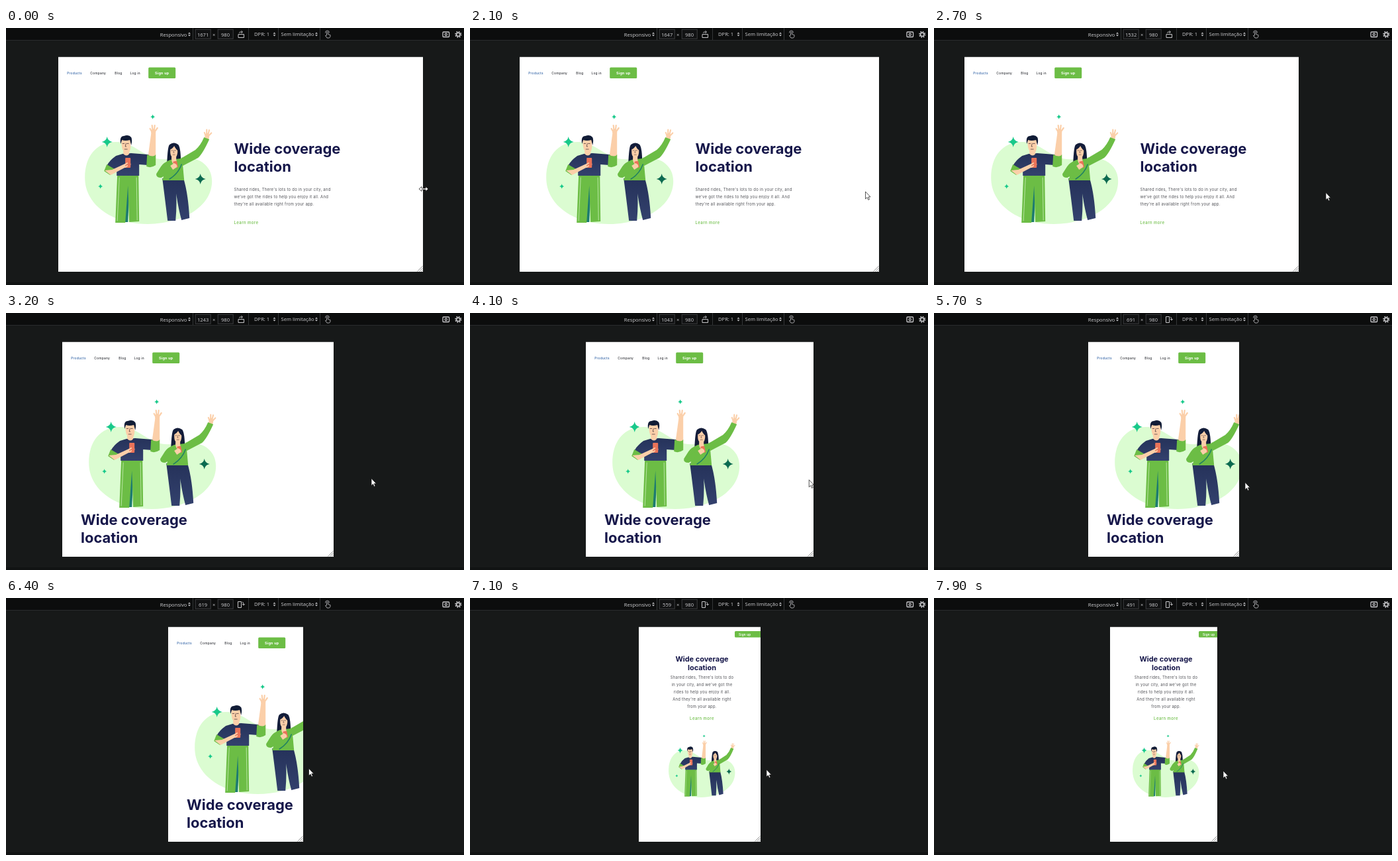
Write an HTML page that moves like this. It is 692x388 px and loops after 8000 ms.

```html
<!DOCTYPE html>
<html lang="pt">
<head>
<meta charset="utf-8">
<title>Responsive view</title>
<style>
html, body { margin: 0; width: 100%; height: 100%; overflow: hidden; background: #171919; }
svg { display: block; }
#stage { width: 692px; height: 388px; }
text { font-family: Inter, "Open Sans", sans-serif; white-space: pre; }
.bar text { font: 7.6px "Noto Sans", "Open Sans", sans-serif; fill: #c3c3c6; }
.icon { fill: none; stroke: #c6c6c9; stroke-width: 1; }
.sep { stroke: #343638; }
.box { fill: #111213; stroke: #3c3e40; }
.nav { font-size: 4.8px; font-weight: 500; letter-spacing: .24px; fill: #34363c; }
.title { font-size: 21.95px; font-weight: 700; fill: #16174a; }
.body { font-size: 5.9px; letter-spacing: .26px; fill: #505156; }
.link { font-size: 6px; font-weight: 500; letter-spacing: .42px; fill: #6cbd45; }
.sign { font-size: 5.4px; font-weight: 700; letter-spacing: .22px; fill: #fff; }
.mid { text-anchor: middle; }
.skin { fill: #fbcfa9; }
.green { fill: #6cbd45; }
.navy { fill: url(#navy); }
.line { fill: none; stroke-linecap: round; }
</style>
</head>
<body>
<svg id="stage" viewBox="0 0 692 388">
  <defs>
    <path id="sort" d="M0 -.7L2 -3L4 -.7ZM0 .7L2 3L4 .7Z" fill="#c3c3c6"/>
    <path id="star" d="M0 -8Q1.200 -1.200 8 0Q1.200 1.200 0 8Q-1.200 1.200 -8 0Q-1.200 -1.200 0 -8Z"/>
    <linearGradient id="navy" x2="0" y2="1"><stop stop-color="#25325a"/><stop offset="1" stop-color="#33416d"/></linearGradient>
    <g id="hand">
      <ellipse class="skin" cy="-4" rx="3.600" ry="6"/>
      <path class="line" stroke="#fbcfa9" stroke-width="2.200" d="M-1 -3L-5 -10M-1 -6L-2 -15M1 -6L2 -15M1 -4L6 -11"/>
    </g>
    <path id="face" class="line" stroke="#3b2b34" stroke-width=".7" d="M-5 0H-2.500M1.500 0H4M0 0L-1 4.500H.5M-2 8.500H2"/>

    <g id="art">
      <path fill="#dbfcd1" d="M119 226C119 194 136 172 166 172C196 172 212 202 244 198C286 188 311 205 311 231C311 272 262 296 214 296C160 296 119 267 119 226Z"/>
      <use href="#star" x="152.500" y="172" fill="#18c98a"/>
      <use href="#star" transform="translate(221.500 134) scale(.48)" fill="#18c98a"/>
      <use href="#star" transform="translate(142.500 239) scale(.48)" fill="#18c98a"/>
      <use href="#star" x="293.500" y="228" fill="#0b6a50"/>

      <!-- man -->
      <path class="skin" d="M213 204L219 160H226V204Z"/>
      <use href="#hand" x="222.500" y="162"/>
      <path fill="#1d7b70" d="M181 230H187L184 293H179Z"/>
      <path class="green" d="M168 221H200L201 292L186 293L184 238L180 294H165Z"/>
      <path class="line" stroke="#c9efb8" stroke-width=".8" d="M171 226L168 291M197 226L198 290"/>
      <path class="navy" d="M176 190L166 193Q156 200 152 208L163 215L167 212V223H201V206L214 207Q217 204 215 191L189 189Z"/>
      <path class="green" d="M152 206L164 213L157 222L148 216ZM213 191Q223 196 226 191V207Q219 212 212 209Z"/>
      <path class="skin" d="M149 215L158 222L179 211L187 209Q190 205 186 202L160 214Z"/>
      <rect x="180" y="196" width="8" height="15" rx="1" fill="#ea7359"/>
      <path class="line" stroke="#fbcfa9" stroke-width="2" d="M180 206L183 204M180 210L183 208"/>
      <path class="skin" d="M174 168H188V180Q187 187 186 187V190Q182 195 177 190V185Q174 182 174 168Z"/>
      <path fill="#111c36" d="M173 175Q171 163 178 163Q185 160 189 165Q191 169 189 177L187 169Q180 171 175 169Z"/>
      <use href="#face" x="181" y="174.500"/>

      <!-- woman -->
      <use href="#hand" transform="translate(303 168) rotate(8) scale(.95)"/>
      <path fill="#141d3a" d="M243 205Q244 178 247 176Q253 171 260 176Q264 181 264 204Q256 207 243 205Z"/>
      <path class="navy" d="M236 227H268Q275 250 277 287L265 290Q260 272 257 250Q258 270 256 291H244Q240 258 236 227Z"/>
      <path class="green" d="M248 199Q238 203 234 209L227 220Q226 226 234 226L238 224L236 230H269L267 208L290 196Q297 190 307 168L299 165Q294 177 286 184L264 197Z"/>
      <path class="line" stroke="#218062" stroke-width="1.600" d="M265 206Q260 220 247 228"/>
      <path class="skin" d="M248 179Q254 175 259 180V188Q258 194 257 194V199Q259 203 254 206Q249 204 250 194Q248 192 248 187Z"/>
      <path fill="#141d3a" d="M246 184Q248 174 255 176Q261 178 261 186Q256 183 254 178Q251 183 246 184Z"/>
      <use href="#face" transform="translate(253.500 185) scale(.75)"/>
      <path class="green" d="M229 218L248 208L252 213L234 226Z"/>
      <rect x="253" y="201" width="6" height="10" rx="1" fill="#ea7359" transform="rotate(-12 256 206)"/>
      <path class="skin" d="M248 208L254 204Q259 206 258 210L252 214Z"/>
    </g>
  </defs>

  <rect width="692" height="388" fill="#171919"/>
  <rect y="384" width="692" height="4" fill="#111313"/>

  <g class="bar">
    <rect width="692" height="18.500" fill="#0c0d0d"/>
    <path d="M0 18.500H692" stroke="#2a2c2d"/>
    <path class="sep" d="M282.500 0V18M366.500 0V18M411.500 0V18M474.500 0V18"/>
    <rect class="box" x="286.200" y="2.200" width="23" height="14"/>
    <rect class="box" x="320.200" y="2.200" width="23" height="14"/>
    <text x="232.800" y="12.500">Responsivo</text>
    <text id="size" class="mid" x="297.600" y="12.500">1671</text>
    <text class="mid" x="314.200" y="12.500">×</text>
    <text class="mid" x="331.500" y="12.500">980</text>
    <text x="375" y="12.300">DPR: 1</text>
    <text x="415.500" y="12.300">Sem limitação</text>
    <use href="#sort" x="275" y="9.500"/>
    <use href="#sort" x="403.500" y="9.500"/>
    <use href="#sort" x="467" y="9.500"/>
    <g class="icon">
      <path id="wide" d="M351 9.500H359.500V14.500H351ZM352 7.500Q352.500 5.500 357 6M355.500 4.200L357.500 6L355.500 7.800"/>
      <path id="tall" d="M350.500 5.500H355.500V14.500H350.500ZM357 6Q359 6 359 10.500M357.200 9L359 11L360.800 9"/>
      <path d="M484.500 11V6.500Q485.500 5 486.500 6.500V9.500L490 10.500V13L488.500 15H485L482.500 11.500ZM482.700 7.500Q482.300 4 485.500 4Q488.700 4 488.300 7.500" stroke-width=".8"/>
      <rect x="660" y="6" width="9.600" height="7.500" rx="1" stroke-width="1.300"/>
      <circle cx="664.800" cy="9.800" r="1.600" stroke-width="1.200"/>
      <circle cx="683.300" cy="9.800" r="2.700" stroke-width="1.600"/>
      <circle cx="683.300" cy="9.800" r="4.300" stroke-width="1.600" stroke-dasharray="1.690"/>
    </g>
  </g>

  <svg id="panel" y="43.500" height="324.500" overflow="hidden">
    <rect width="100%" height="100%" fill="#fff"/>
    <!-- rows follow the stage, columns follow the panel -->
    <g transform="translate(0 -43.500)">
      <g id="desk">
        <text class="nav" x="13.300" y="69.700" style="fill:#3767a8">Products</text>
        <text class="nav" x="48.300" y="69.700">Company</text>
        <text class="nav" x="85.300" y="69.700">Blog</text>
        <text class="nav" x="108.500" y="69.700">Log in</text>
        <rect x="136.200" y="59.500" width="41" height="16.500" rx="1.500" class="green"/>
        <text class="sign mid" x="156.700" y="69.700">Sign up</text>
        <use href="#art" x="-78.800"/>
        <g id="head" class="title"><text>Wide coverage</text><text y="27">location</text></g>
        <g id="copy" transform="translate(265.500 0)">
          <g class="body">
            <text y="245.700">Shared rides, There's lots to do in your city, and</text>
            <text y="256.700">we've got the rides to help you enjoy it all. And</text>
            <text y="267.700">they're all available right from your app.</text>
          </g>
          <text class="link" y="296">Learn more</text>
        </g>
      </g>
      <g id="phone">
        <rect x="53" y="50" width="41" height="9.500" rx="1.500" class="green"/>
        <text class="sign" x="59" y="56.500" style="font-size:4.6px;font-weight:600">Sign up</text>
        <g class="mid" transform="translate(3.500 0)">
          <g class="title" style="font-size:10.950px"><text y="95.800">Wide coverage</text><text y="108.800">location</text></g>
          <g class="body">
            <text y="122">Shared rides, There's lots to do</text>
            <text y="133">in your city, and we've got the</text>
            <text y="144">rides to help you enjoy it all.</text>
            <text y="155">And they're all available right</text>
            <text y="166">from your app.</text>
          </g>
          <text class="link" y="184">Learn more</text>
        </g>
        <use href="#art" transform="translate(-109.200 131.700) scale(.523 .572)"/>
      </g>
    </g>
    <path id="grip" d="M-8 324L0 316M-5 324L0 319M-2 324L0 322" stroke="#777" stroke-width=".8"/>
  </svg>

  <g fill="#fff" stroke="#111" stroke-width=".7" stroke-linejoin="round">
    <path id="arrow" d="M0 0V11L2.500 8.700L4.300 12.500L6 11.700L4.300 8H7.500Z"/>
    <path id="resize" d="M-7 0L-3 -3.500V-1H3V-3.500L7 0L3 3.500V1H-3V3.500Z"/>
  </g>
</svg>
<script>
const $ = id => document.getElementById(id);
const set = (id, attrs) => { for (const k in attrs) $(id).setAttribute(k, attrs[k]); };
const show = (id, on) => { $(id).style.display = on ? "" : "none"; };
const move = (id, x, y) => set(id, { transform: `translate(${x} ${y})` });

const LOOP = 8000, STEP = 100, ZOOM = .33, CENTRE = 347;

// [time, value] stops of the drag, joined by straight runs
const widths = [[1500, 1671], [1900, 1647], [2500, 1647], [3200, 1243], [3500, 1243], [4300, 976],
  [4600, 976], [4700, 935], [4800, 935], [5200, 776], [5700, 691], [6400, 619], [7900, 491]];
const pointer = [[1500, 631], [2100, 597.5], [2500, 608], [3200, 552], [3500, 552],
  [4300, 499], [4700, 489], [5700, 470], [6400, 457.5], [7900, 437]];

function along(stops, t) {
  const i = stops.findIndex(s => s[0] > t);
  if (i === 0) return stops[0][1];
  if (i < 0) return stops[stops.length - 1][1];
  const [t0, a] = stops[i - 1], [t1, b] = stops[i];
  return a + (b - a) * (t - t0) / (t1 - t0);
}

// the panel is off centre during the first drags, then settles
function offCentre(t) {
  if (t < 1800) return 7.7;
  const p = (t - 2500) / 950;
  return p > 0 && p < 1 ? -78 * Math.sin(Math.PI * p) : 0;
}

function draw(now) {
  const t = Math.floor(now % LOOP / STEP) * STEP;
  const css = Math.round(along(widths, t));
  const w = Math.floor(css * ZOOM);
  const left = Math.round(CENTRE + offCentre(t) - css * ZOOM / 2);
  const phone = css < 576, columns = css > 1320, dragging = t < 1900;

  set("panel", { x: left, width: w });
  move("grip", w - .5, 0);
  $("size").textContent = css;
  show("wide", css >= 980);
  show("tall", css < 980);
  show("desk", !phone);
  show("phone", phone);
  show("copy", columns);
  move("head", columns ? 265.5 : 28, columns ? 189.5 : 319.5);
  move("phone", w / 2, 0);

  show("resize", dragging);
  show("arrow", !dragging);
  const y = dragging ? 243 : 247 + (t - 2100) * .0024;
  move(dragging ? "resize" : "arrow", along(pointer, t), y);
}

const start = performance.now();
function tick() {
  draw(performance.now() - start);
  requestAnimationFrame(tick);
}
tick();
</script>
</body>
</html>
```
